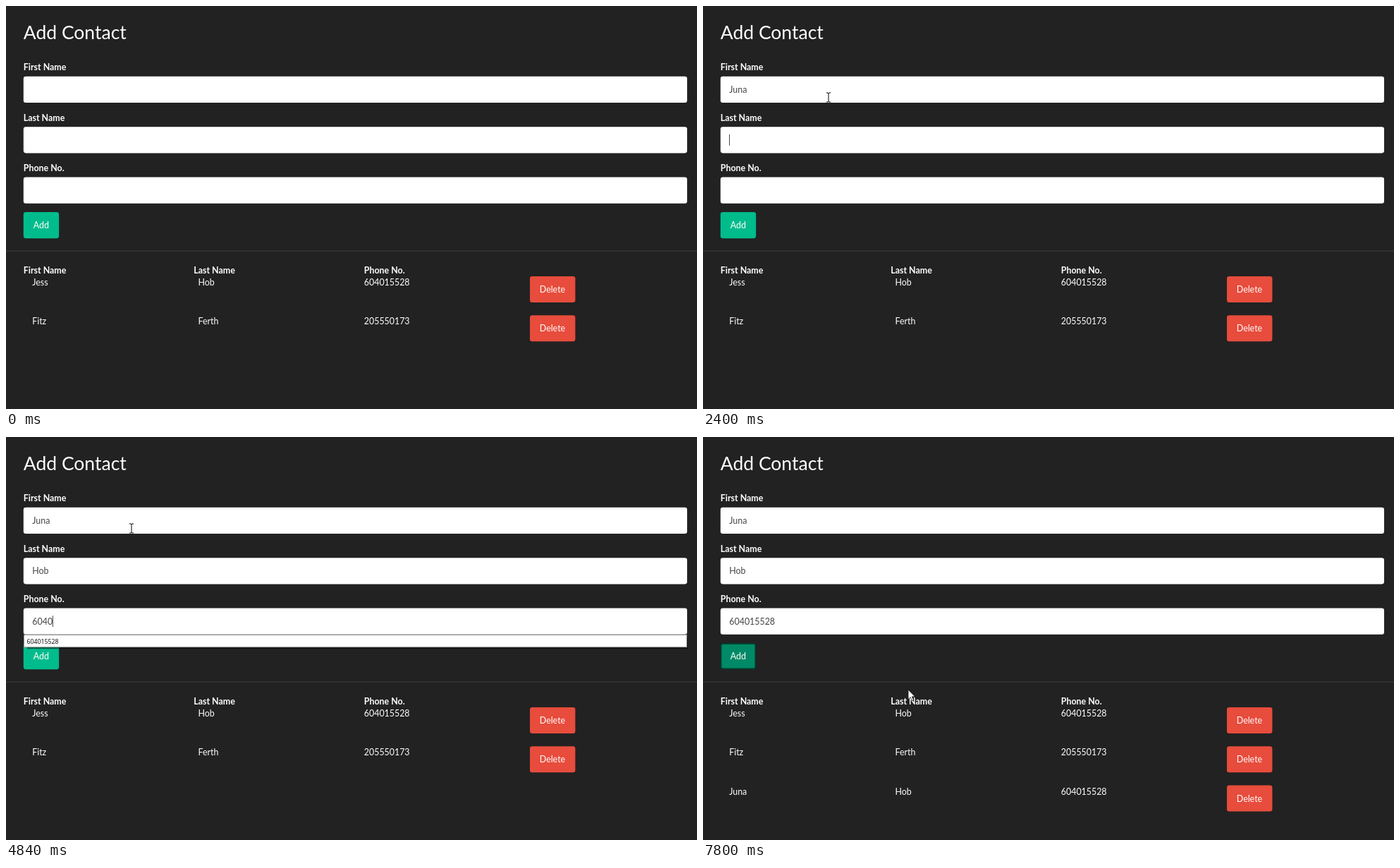
Animation of 980 by 571 pixels, one loop 8 s. Source, as an HTML page:

```html
<!DOCTYPE html>
<html lang="en">
<head>
<meta charset="utf-8">
<title>Add Contact</title>
<style>
  html, body { margin: 0; width: 100%; height: 100%; overflow: hidden; background: #222; }
  svg { display: block; width: 980px; height: 571px; }
  text { font: 12.41px Lato, sans-serif; fill: #fff; white-space: pre; }
  .title { font-size: 26.5px; }
  .bold { font-weight: 700; }
  .value { fill: #464545; }
  .item { font: 8.75px "Open Sans", sans-serif; fill: #000; }
  .beam { mix-blend-mode: difference; fill: none; stroke: #fff; }
  .pointer { fill: #fff; stroke: #111; stroke-width: .8; stroke-linejoin: round; }
</style>
</head>
<body>
<svg id="stage" viewBox="0 0 980 571">
  <rect width="980" height="571" fill="#222"/>
  <text class="title" x="24.8" y="47">Add Contact</text>
  <g id="form"></g>
  <g id="add">
    <rect x="25.6" y="292.9" width="48.7" height="35.4" rx="2.6" stroke-width="1.65"/>
    <text x="38.8" y="315">Add</text>
  </g>
  <rect y="346.6" width="980" height=".9" fill="#464545"/>
  <g id="table"></g>
  <g id="menu">
    <rect id="shade" x="30" width="937" fill="#000" opacity=".5"/>
    <rect id="panel" x="25.4" width="940.2" fill="#fff" stroke="#8a8a8a" stroke-width=".85"/>
  </g>
  <rect id="caret" width=".9" height="16" fill="#333"/>
  <path id="beam" class="beam" d="M-3-6.5H-1L0-5.8 1-6.5H3M0-5.8V5.8M-3 6.5H-1L0 5.8 1 6.5H3"/>
  <path id="arrow" class="pointer" d="M0 0V13.8L3.2 10.8 5.3 15.6 7.6 14.6 5.5 9.9H9.8Z"/>
  <path id="hand" class="pointer" d="M-1.3 0Q0-1.3 1.3 0V5.6L6.8 6.8Q8.3 7.3 8.2 9L7.2 15.5V17.5H-1.4V15.5L-5.2 10.4Q-5-8.5 -5 9Q-3.6 8-1.3 10.5Z"/>
</svg>
<script>
const LOOP = 8000, PHONE = "604015528";
const typed = ["Juna", "Hob", PHONE];
const known = [["Jess", "Jud", "Juna"], ["Hob"], [PHONE]];
const labels = ["First Name", "Last Name", "Phone No."];
const rows = [["Jess", "Hob", PHONE], ["Fitz", "Ferth", "205550173"], typed];
const fieldTop = i => 100 + i * 71.4;

// Each step: start time, then the state that changes.
const steps = [
  [0, { field: 0, len: 0, caret: false, menu: false, focus: false, added: false }],
  [940, { caret: true }], [1480, { caret: false }],
  [1850, { len: 1, caret: true }], [1940, { menu: true }],
  [2040, { len: 2 }], [2120, { len: 3 }], [2330, { len: 4 }],
  [2400, { field: 1, len: 0, menu: false }],
  [2680, { len: 1 }], [2770, { len: 2, menu: true }], [2870, { len: 3 }],
  [3150, { field: 2, len: 0, menu: false }], [3700, { caret: false }],
  [3990, { len: 1, caret: true }], [4070, { menu: true }],
  ...[4360, 4630, 4840, 5020, 5210, 5470, 5680, 5860].map((t, i) => [t, { len: i + 2 }]),
  [6420, { caret: false }], [6770, { menu: false }],
  [7330, { focus: true }], [7420, { added: true }]
];

// Mouse samples: time, x, y.
const path = [
  [80, 842, 529], [180, 760, 479], [270, 620, 395], [360, 470, 300], [450, 330, 222],
  [540, 248, 173.5], [640, 205, 148], [730, 185, 134], [820, 178, 129.5],
  [6240, 184, 141], [6330, 199, 190], [6420, 191, 270], [6510, 150, 326], [6590, 115, 335],
  [6980, 95, 329], [7060, 70, 318], [7150, 55, 312],
  [7520, 90, 321], [7610, 170, 338], [7710, 245, 351], [7800, 291, 358]
];

const $ = id => document.getElementById(id);
const set = (el, attrs) => { for (const k in attrs) el.setAttribute(k, attrs[k]); return el; };
const show = (el, on) => set(el, { visibility: on ? "visible" : "hidden" });
function make(parent, tag, attrs, content = "") {
  const el = set(document.createElementNS("http://www.w3.org/2000/svg", tag), attrs);
  el.textContent = content;
  return parent.appendChild(el);
}

const values = labels.map((label, i) => {
  const y = fieldTop(i);
  make($("form"), "text", { class: "bold", x: 24.8, y: y - 8.6 }, label);
  make($("form"), "rect", { x: 24.8, y: y - .2, width: 941.2, height: 37.2, rx: 3.3, fill: "#fff" });
  return make($("form"), "text", { class: "value", x: 37.3, y: y + 22.7 });
});

labels.forEach((label, i) => make($("table"), "text", { class: "bold", x: 24.8 + i * 241.5, y: 378.5 }, label));
const rowEls = rows.map((cells, r) => {
  const g = make($("table"), "g", { transform: `translate(0 ${r * 55.3})` });
  cells.forEach((cell, i) => make(g, "text", { x: 37.2 + i * 235.3, y: 396.2 }, cell));
  make(g, "rect", { x: 743, y: 383, width: 64.4, height: 37, rx: 3.3, fill: "#e74c3c" });
  make(g, "text", { x: 756.8, y: 406 }, "Delete");
  return g;
});
const items = [0, 1, 2].map(() => make($("menu"), "text", { class: "item", x: 29.5 }));

function drawMenu(state, text) {
  const list = state.menu ? known[state.field].filter(name => name.startsWith(text)) : [];
  const top = fieldTop(state.field) + 37.5, height = list.length * 16.5 + 1;
  set($("menu"), { display: list.length ? "inline" : "none" });
  set($("panel"), { y: top, height });
  set($("shade"), { y: top + 4, height: height - 1.6 });
  items.forEach((el, i) => {
    el.textContent = list[i] || "";
    set(el, { y: top + 12.6 + i * 16.5 });
  });
}

function drawMouse(t) {
  const sample = path.filter(p => p[0] <= t).pop();
  const [, x, y] = sample || [0, -50, -50];
  const inField = x > 25 && x < 966 && labels.some((_, i) => y >= fieldTop(i) && y <= fieldTop(i) + 37);
  const inAdd = x > 25 && x < 75 && y > 292 && y < 329;
  const kind = inField ? "beam" : inAdd ? "hand" : "arrow";
  for (const id of ["beam", "arrow", "hand"]) {
    show($(id), sample && id === kind);
    set($(id), { transform: `translate(${x} ${y})` });
  }
  return inAdd;
}

function draw(t) {
  const state = Object.assign({}, ...steps.filter(s => s[0] <= t).map(s => s[1]));
  values.forEach((el, i) => {
    const len = i < state.field ? typed[i].length : i === state.field ? state.len : 0;
    el.textContent = typed[i].slice(0, len);
  });
  const active = values[state.field];
  show($("caret"), state.caret);
  set($("caret"), {
    x: 37.1 + (state.len ? active.getComputedTextLength() : 0),
    y: fieldTop(state.field) + 10.3
  });
  drawMenu(state, active.textContent);

  const hover = drawMouse(t);
  set($("add").firstElementChild, {
    fill: hover || state.focus ? "#008966" : "#00bc8c",
    stroke: state.focus ? "#003d2d" : hover ? "#007f5e" : "#00bc8c"
  });
  show(rowEls[2], state.added);
}

const start = performance.now();
function tick() {
  draw((performance.now() - start) % LOOP);
  requestAnimationFrame(tick);
}
tick();
</script>
</body>
</html>
```
